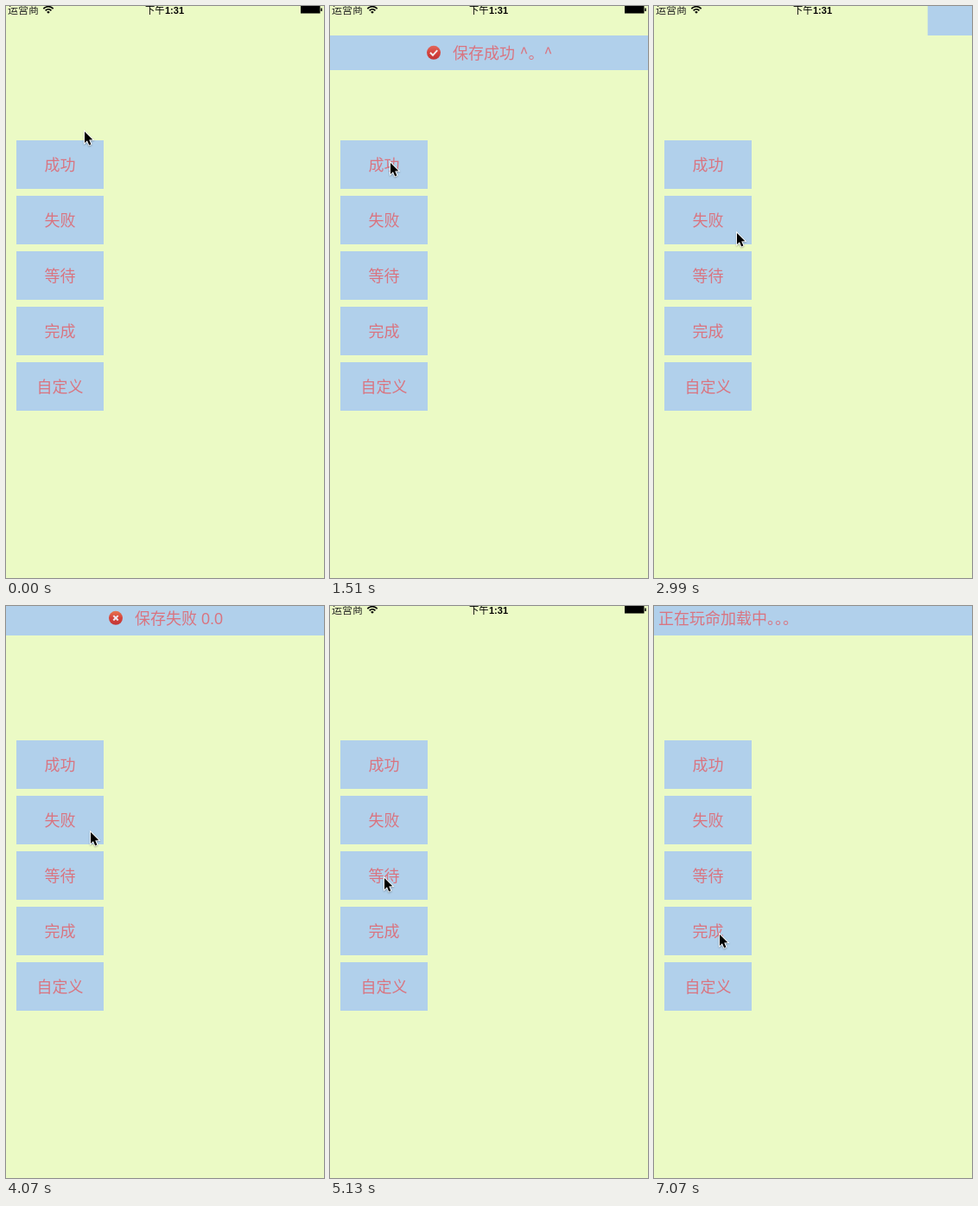
Animation of 368 by 660 pixels, one loop 8000 ms. Source, as an HTML page with a canvas:

```html
<!DOCTYPE html>
<html lang="zh-CN">
<head>
<meta charset="utf-8">
<style>
html, body { margin: 0; width: 100%; height: 100%; overflow: hidden; background: #ebfac5; }
canvas { display: block; width: 368px; height: 660px; }
</style>
</head>
<body>
<canvas id="stage" width="368" height="660"></canvas>
<script>
const W = 368, H = 660, LOOP = 8000, STEP = 88.4;
const BG = '#ebfac5', BLUE = '#b1d0eb', RED = '#d97480';
const CJK = '"Noto Sans CJK SC", "Noto Sans CJK JP", sans-serif';
const LATIN = '"Liberation Sans", Arial, sans-serif';
const c = document.getElementById('stage').getContext('2d');

const BUTTONS = ['成功', '失败', '等待', '完成', '自定义'];
// time, x, y of the pointer tip
const POINTER = [
  [0, 91, 145], [440, 70, 181], [1945, 70, 181], [2290, 79, 261],
  [2460, 78, 273], [2560, 78, 273], [3100, 98, 261], [4070, 98, 261],
  [4860, 66, 323], [5130, 63, 314], [5980, 63, 314], [6460, 94, 376],
  [6700, 95, 388], [7070, 76, 379]
];

const clamp = v => Math.max(0, Math.min(1, v));
const part = (t, a, b) => clamp((t - a) / (b - a));
const smooth = p => p * p * (3 - 2 * p);
const easeOut = p => 1 - (1 - p) ** 3;
const mix = (a, b, p) => a + (b - a) * p;

function text(s, x, y, size, weight = 400, color = RED, family = CJK, align = 'left') {
  c.font = `${weight} ${size}px ${family}`;
  c.fillStyle = color;
  c.textAlign = align;
  c.fillText(s, x, y);
}

function line(points, width, color) {
  c.beginPath();
  points.forEach(([x, y]) => c.lineTo(x, y));
  c.lineWidth = width;
  c.strokeStyle = color;
  c.stroke();
}

function statusBar() {
  text('运营商', 2, 9, 12, 400, '#222');
  text('下午', 161, 9, 11.3, 500, '#000');
  text('1:31', 184, 9, 11, 700, '#000', LATIN);
  c.strokeStyle = c.fillStyle = '#000';
  c.lineWidth = 1.7;
  for (const r of [4.6, 7.8]) {
    c.beginPath();
    c.arc(49, 8.5, r, -Math.PI * 0.76, -Math.PI * 0.24);
    c.stroke();
  }
  c.beginPath();
  c.moveTo(49, 8.8);
  c.arc(49, 8.5, 2.4, -Math.PI * 0.78, -Math.PI * 0.22);
  c.fill();
  c.fillRect(341, 0, 22.5, 8.5);
  c.fillRect(364.3, 2.5, 1.5, 3.5);
}

function buttons() {
  BUTTONS.forEach((label, i) => {
    const y = 155 + i * 64;
    c.fillStyle = BLUE;
    c.fillRect(12, y, 101, 56);
    text(label, 62.5, y + 35, 18, 500, RED, CJK, 'center');
  });
}

function icon(x, y, ok) {
  const g = c.createLinearGradient(0, y - 8, 0, y + 8);
  g.addColorStop(0, ok ? '#e2685c' : '#e8764f');
  g.addColorStop(0.5, '#d5443d');
  g.addColorStop(1, '#c23535');
  c.fillStyle = g;
  c.beginPath();
  c.arc(x, y, 8, 0, Math.PI * 2);
  c.fill();
  if (ok) {
    line([[x - 4, y], [x - 1, y + 3], [x + 4.2, y - 2.7]], 2, '#f4eeee');
  } else {
    line([[x - 2.7, y - 2.7], [x + 2.7, y + 2.7]], 2, '#eee9ee');
    line([[x + 2.7, y - 2.7], [x - 2.7, y + 2.7]], 2, '#eee9ee');
  }
}

function banner(x, y, content) {
  c.save();
  c.translate(x, y);
  c.fillStyle = BLUE;
  c.fillRect(0, 0, W, 40);
  content();
  c.restore();
}

function saved() {
  icon(120, 19.8, true);
  text('保存成功', 142, 26.5, 18);
  text('^。^', 219.5, 26.5, 18);
}

function failed() {
  icon(127, 19.8, false);
  text('保存失败', 149, 26.5, 18);
  text('0.0', 226, 26.5, 18, 400, RED, LATIN);
}

function banners(t) {
  const exit = start => W * smooth(part(t, start, start + 530));
  if (t > 1100 && t < 3170) {
    const drop = mix(-40, 34, smooth(part(t, 1100, 1500)));
    banner(exit(2600), mix(drop, -6, smooth(part(t, 1510, 1680))), saved);
  } else if (t > 3480 && t < 5125) {
    banner(exit(4580), mix(0, -6, part(t, 3540, 3615)), failed);
  } else if (t > 5640) {
    const y = mix(-40, -6, easeOut(part(t, 5660, 6040)));
    const x = mix(W, 5, smooth(part(t, 5660, 6195)));
    banner(0, y, () => text('正在玩命加载中。。。', x, 26.5, 18));
  }
}

function pointer(t) {
  let i = 0;
  while (i < POINTER.length - 2 && t > POINTER[i + 1][0]) i++;
  const [ta, xa, ya] = POINTER[i], [tb, xb, yb] = POINTER[i + 1];
  const p = smooth(part(t, ta, tb));
  c.save();
  c.translate(Math.round(mix(xa, xb, p)), Math.round(mix(ya, yb, p)));
  c.beginPath();
  [[0, 0], [0, 13], [3, 10.3], [5.2, 15.4], [7.4, 14.4], [5.2, 9.4], [9.3, 9.2]]
    .forEach(([x, y]) => c.lineTo(x, y));
  c.closePath();
  c.shadowColor = 'rgba(0,0,0,.3)';
  c.shadowBlur = 2;
  c.shadowOffsetY = 1;
  c.lineWidth = 1.8;
  c.strokeStyle = '#fff';
  c.stroke();
  c.shadowColor = 'transparent';
  c.fillStyle = '#000';
  c.fill();
  c.restore();
}

const origin = performance.now();

function draw(now) {
  const elapsed = Math.max(0, now - origin) % LOOP;
  const t = Math.floor((elapsed + 18) / STEP) * STEP;
  c.fillStyle = BG;
  c.fillRect(0, 0, W, H);
  statusBar();
  buttons();
  banners(t);
  pointer(t);
  requestAnimationFrame(draw);
}
draw(origin);
</script>
</body>
</html>
```
